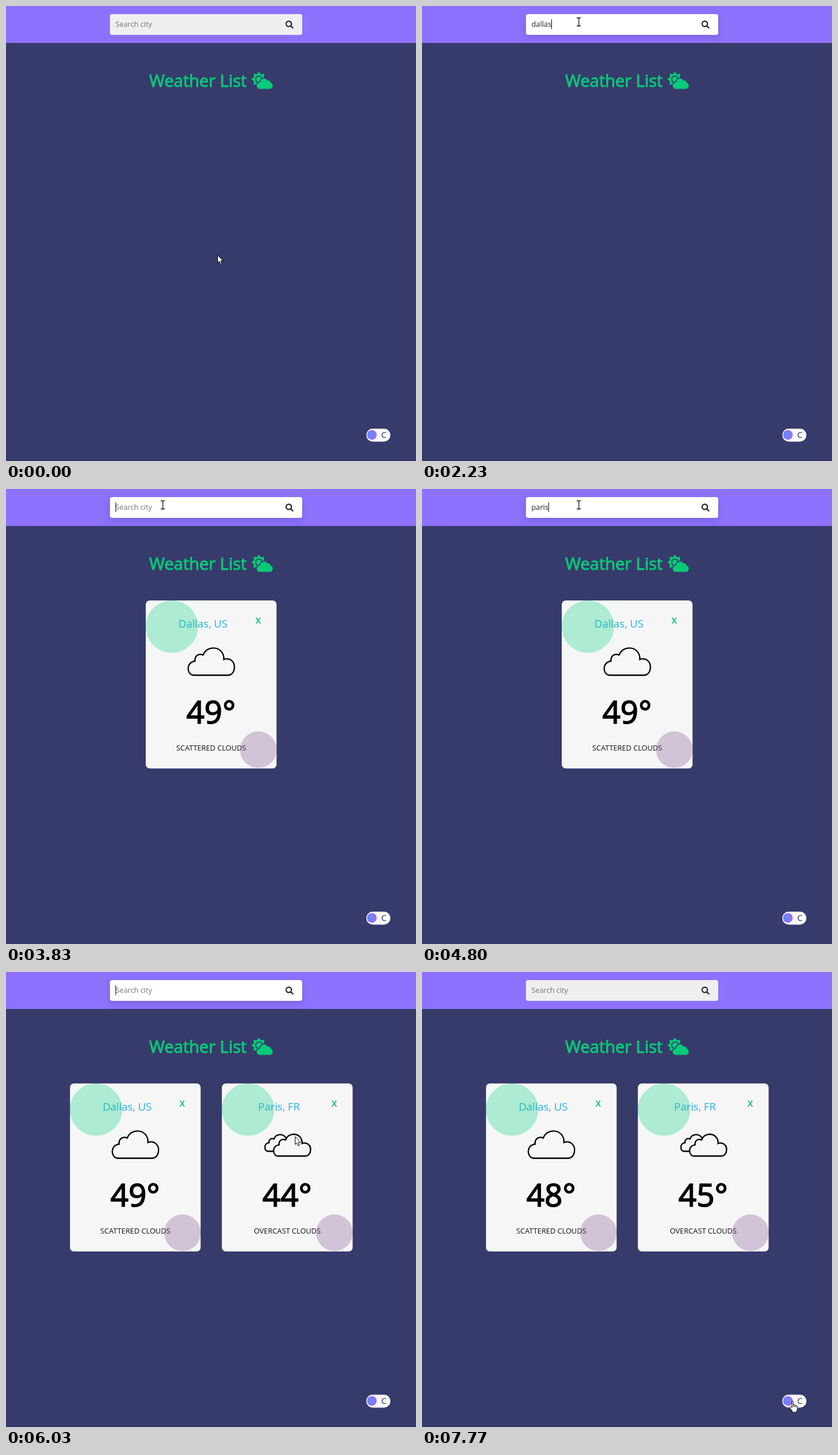
An HTML page that plays this animation: 710 px wide and 788 px high, repeating every 8 s.

```html
<!DOCTYPE html>
<html lang="en">
<head>
<meta charset="utf-8">
<title>Weather List</title>
<style>
  html, body { margin: 0; width: 100%; height: 100%; overflow: hidden; background: #363b6c; }
  body { position: relative; }
  #bar { position: absolute; left: 0; top: 0; width: 710px; height: 63.5px; background: #8e72ff; }
  #field {
    position: absolute; left: 180.3px; top: 13.5px; width: 332.7px; height: 36.3px;
    border-radius: 4px; background: #efefef; animation: focus 8s linear infinite;
  }
  #stage { position: absolute; left: 0; top: 0; }
  text { font-family: "Open Sans", "Noto Sans", sans-serif; }
  .mid { text-anchor: middle; }
  .title { font-size: 29px; fill: #08ca77; stroke: #08ca77; stroke-width: .95px; }
  .input { font-size: 12.7px; }
  .city { font-size: 18.4px; fill: #2cb0e6; }
  .temp { font-size: 54.4px; stroke: #000; stroke-width: 1.7px; }
  .desc { font-size: 12.75px; fill: #111; }
  .close { font-size: 14.5px; fill: #0fbd74; stroke: #0fbd74; stroke-width: .6px; }
  .unit { font-size: 14.5px; }
  .line { fill: #f6f6f6; stroke: #000; stroke-width: 2.3px; vector-effect: non-scaling-stroke; }

  #first { animation: first 8s step-end infinite; }
  #second { animation: second 8s step-end infinite; }
  #knob { animation: knob 8s ease-in-out infinite; }
  #unitF { animation: unitF 8s step-end infinite; }
  #unitC { animation: unitC 8s step-end infinite; }

  #moveX, #moveY { position: absolute; left: 0; top: 0; width: 0; height: 0; }
  #moveX { animation: moveX 8s linear infinite; }
  #moveY { animation: moveY 8s linear infinite; }
  #moveY svg { position: absolute; left: 0; top: 0; overflow: visible; }
  #arrow { animation: arrow 8s step-end infinite; }
  #beam { animation: beam 8s step-end infinite; }
  #hand { animation: hand 8s step-end infinite; }

  @keyframes focus {
    0%, 10.875% { background: #efefef; box-shadow: 0 4px 14px rgba(0,0,0,0); animation-timing-function: ease; }
    13.75%, 84.125% { background: #fff; box-shadow: 0 4px 14px rgba(0,0,0,.16); animation-timing-function: ease; }
    87%, 100% { background: #efefef; box-shadow: 0 4px 14px rgba(0,0,0,0); }
  }
  @keyframes first {
    0% { opacity: 0; transform: translate(242px, 193px); }
    29.125% { opacity: 1; transform: translate(242px, 193px); }
    61.25%, 100% { opacity: 1; transform: translate(110.6px, 193px); }
  }
  @keyframes second {
    0% { opacity: 0; }
    61.25%, 100% { opacity: 1; }
  }
  @keyframes knob {
    0%, 85.2% { transform: translateX(0); }
    88.75%, 92.75% { transform: translateX(22.4px); }
    97.1%, 100% { transform: translateX(0); }
  }
  @keyframes unitF {
    0% { fill: #20b4e4; }
    85% { fill: #232a66; }
    92.5%, 100% { fill: #20b4e4; }
  }
  @keyframes unitC {
    0% { fill: #232a66; }
    85% { fill: #20b4e4; }
    92.5%, 100% { fill: #232a66; }
  }
  @keyframes moveX {
    0%, 2.5% { transform: translateX(366px); animation-timing-function: ease-in-out; }
    8.75%, 70.875% { transform: translateX(271.5px); animation-timing-function: cubic-bezier(.35,.1,.5,1); }
    80%, 100% { transform: translateX(641px); }
  }
  @keyframes moveY {
    0%, 2.5% { transform: translateY(431px); animation-timing-function: ease-in-out; }
    8.75%, 70.875% { transform: translateY(27.5px); animation-timing-function: ease-in-out; }
    72.3% { transform: translateY(16px); animation-timing-function: cubic-bezier(.45,.05,.5,1); }
    80%, 86.25% { transform: translateY(740px); }
    87.5%, 100% { transform: translateY(742.5px); }
  }
  @keyframes arrow {
    0% { opacity: 1; }
    7.7% { opacity: 0; }
    73.7% { opacity: 1; }
    79%, 100% { opacity: 0; }
  }
  @keyframes beam {
    0% { opacity: 0; }
    7.7% { opacity: 1; }
    73.7%, 100% { opacity: 0; }
  }
  @keyframes hand {
    0% { opacity: 0; }
    79%, 100% { opacity: 1; }
  }
</style>
</head>
<body>
<div id="bar"></div>
<div id="field"></div>

<svg id="stage" width="710" height="788" viewBox="0 0 710 788">
  <defs>
    <clipPath id="round"><rect width="226.5" height="291" rx="7"/></clipPath>
    <path id="cloud" class="line" d="M324 322.5C318 321.5 315.5 316 315.5 311C315.5 303.5 321 298.5 327.3 298.2
      C326.5 291 331 286.3 336 286.3C338 286.3 339.8 286.6 341.3 287.6C344.5 279 352 275.3 359 275.3
      C370 275.3 378 284 377.2 295.3C379 294.3 381 294.2 382.5 294.2C390 294.2 395.6 300.5 395.6 308
      C395.6 316 391.5 322.5 384 322.5Z"/>
    <rect id="sheet" width="226.5" height="291" rx="7" fill="#f6f6f6"/>
    <g id="tint" clip-path="url(#round)" fill-opacity=".3">
      <circle cx="45.3" cy="45.3" r="45.3" fill="#06d182"/>
      <circle cx="195" cy="258.5" r="31.7" fill="#7b4f8e"/>
    </g>
    <path id="puff" d="M240 512A96 96 0 0 1 265 321A112 112 0 0 1 478 266A64 64 0 0 1 575 326A96 96 0 0 1 544 512Z"/>
  </defs>

  <rect y="787" width="710" height="1" fill="#2f345d"/>

  <text id="hint" class="input" x="189.6" y="36.3" fill="#757575">Search city</text>
  <text id="typed" class="input" x="189.6" y="36.3" fill="#222"></text>
  <rect id="caret" x="189.5" y="23" width="1" height="17" fill="#000" opacity="0"/>
  <g transform="translate(484 25.2) scale(.0273)" fill="none" stroke="#222" stroke-width="80" stroke-linecap="round">
    <circle cx="208" cy="208" r="168"/>
    <path d="M345 345L466 466"/>
  </g>

  <text class="title" x="248" y="140">Weather List</text>
  <g transform="translate(425 114) scale(.0578)" fill="#08ca77">
    <path id="rays" stroke="#08ca77" stroke-width="24" stroke-linejoin="round"/>
    <circle cx="224" cy="224" r="98" fill="none" stroke="#363b6c" stroke-width="30"/>
    <use href="#puff" stroke="#363b6c" stroke-width="56"/>
    <use href="#puff"/>
  </g>

  <g id="first">
    <use href="#sheet"/>
    <text class="city mid" x="99.2" y="46.6">Dallas, US</text>
    <text class="close mid" x="194.6" y="40">X</text>
    <use href="#cloud" x="-242" y="-193"/>
    <text class="temp mid" x="113.25" y="213"></text>
    <text class="desc mid" x="113.25" y="260.3">SCATTERED CLOUDS</text>
    <use href="#tint"/>
  </g>

  <g id="second">
    <g transform="translate(373.8 193)">
      <use href="#sheet"/>
      <text class="city mid" x="99" y="46.6">Paris, FR</text>
      <text class="close mid" x="194.6" y="40">X</text>
      <g transform="translate(74.5 88.7) scale(.61) translate(-315.5 -275.3)"><use href="#cloud"/></g>
      <g transform="translate(89.6 88) scale(.8) translate(-315.5 -275.3)"><use href="#cloud"/></g>
      <text class="temp mid" x="113.25" y="213"></text>
      <text class="desc mid" x="113.25" y="260.3">OVERCAST CLOUDS</text>
      <use href="#tint"/>
    </g>
  </g>

  <rect x="624" y="732" width="41.6" height="22.4" rx="11.2" fill="#fafafa"/>
  <circle id="knob" cx="633.6" cy="742.8" r="8.4" fill="#8e72ff"/>
  <text id="unitF" class="unit" x="629.8" y="748">F</text>
  <text id="unitC" class="unit" x="649.8" y="748">C</text>
</svg>

<div id="moveX"><div id="moveY">
  <svg width="1" height="1" fill="#fff" stroke="#000" stroke-linejoin="round">
    <path id="arrow" d="M.5 .5V14L3.6 11.2L5.9 16.4L8 15.5L5.8 10.4H10Z"/>
    <path id="beam" fill="none" stroke-width="1.3" d="M-3.5 -7H-1Q0 -7 0 -6Q0 -7 1 -7H3.5M0 -6V6M-3.5 7H-1Q0 7 0 6Q0 7 1 7H3.5"/>
    <g id="hand" transform="translate(-5 0)">
      <path d="M4.6 12V1.6C4.6 .2 7 .2 7 1.6V7.5C7 6.3 9.4 6.3 9.4 7.6V8.2C9.4 7.2 11.7 7.2 11.7 8.5V9.1
        C11.7 8.3 14.2 8.3 14.2 9.8V14C14.2 16 12.6 17 12.6 20H5.6C5.6 17.5 1.5 13.5 .8 11.4C.4 10 2.3 9.3 3.2 10.5Z"/>
      <path d="M7 7.5V11M9.4 8.2V11M11.7 9V11.5"/>
    </g>
  </svg>
</div></div>

<script>
  const LOOP = 8000;
  const $ = id => document.getElementById(id);
  const temps = document.querySelectorAll('.temp');

  // [time in ms, text in the field]
  const typing = [
    [0, ''], [1450, 'd'], [1530, 'da'], [1730, 'dal'], [1900, 'dall'], [1970, 'dalla'], [2070, 'dallas'],
    [2230, ''], [4070, 'p'], [4170, 'pa'], [4300, 'par'], [4400, 'pari'], [4570, 'paris'], [4800, '']
  ];
  const caretOn = [[870, 1370], [1450, 2770], [3300, 3830], [4070, 5330], [5860, 6390]];
  const readings = [[0, [49, 44]], [6800, [9, 7]], [7400, [48, 45]]];

  const at = (list, t) => list.filter(([start]) => start <= t).pop()[1];
  const show = (el, on) => el.setAttribute('opacity', on ? 1 : 0);
  const write = (el, s) => { if (el.textContent !== s) el.textContent = s; };

  const ray = i => {
    const r = i % 2 ? 144 : 212, a = i * Math.PI / 8;
    return (224 + r * Math.sin(a)).toFixed(1) + ' ' + (224 - r * Math.cos(a)).toFixed(1);
  };
  $('rays').setAttribute('d', 'M' + Array.from({ length: 16 }, (_, i) => ray(i)).join('L') + 'Z');

  const clock = $('field').getAnimations()[0];

  function draw(now) {
    const t = ((clock && clock.currentTime) ?? now) % LOOP;
    const text = at(typing, t);
    write($('typed'), text);
    show($('hint'), !text);
    $('caret').setAttribute('x', 189.5 + (text ? $('typed').getComputedTextLength() : 0));
    show($('caret'), caretOn.some(([a, b]) => t >= a && t < b));
    at(readings, t).forEach((n, i) => write(temps[i], n + '°'));
    requestAnimationFrame(draw);
  }
  draw(performance.now());
</script>
</body>
</html>
```
